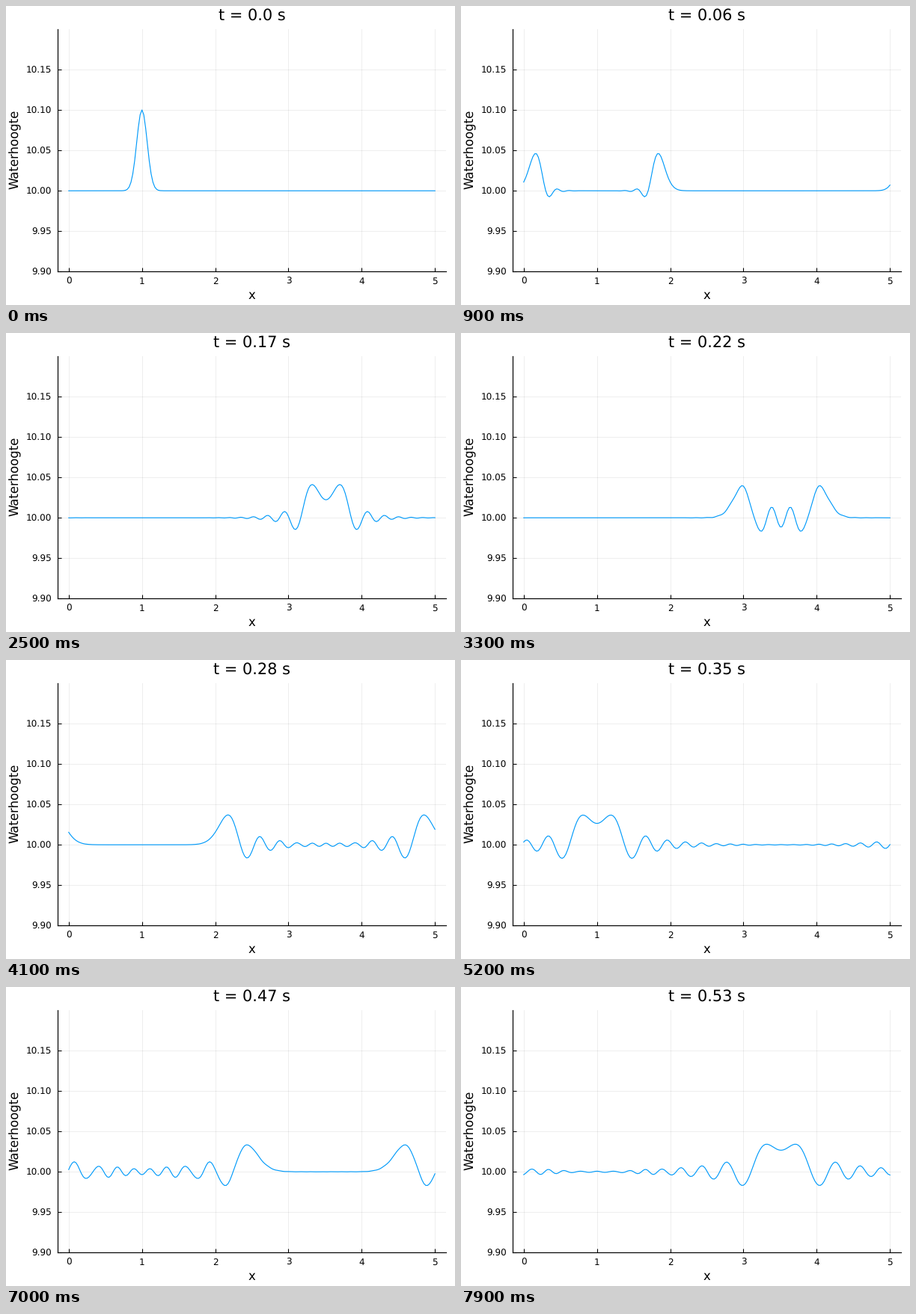
A matplotlib script for the animation above (8 s loop, 600x400 px).

```python
import numpy as np
import matplotlib.pyplot as plt
from matplotlib.animation import FuncAnimation

W, H, DPI = 600, 400, 100
FRAMES, INTERVAL = 80, 100
BLUE = "#009AFA"


def pt(px):
    """Pixels to points."""
    return px * 72 / DPI


plt.rcParams["font.family"] = "DejaVu Sans"
plt.rcParams["text.hinting"] = "none"

# Shallow-water flow on a periodic grid: water height h and discharge q
N, LENGTH, G, DT = 201, 5.0, 9.81, 0.0005
x = np.linspace(0, LENGTH, N)
dx = x[1] - x[0]

# The solver's step size drifts a little, so time is piecewise linear
STEPS = [0, 18, 33, 41, 52, 70, 79]
TIMES = [0, 0.1244, 0.2221, 0.2803, 0.3505, 0.4680, 0.5301]


def slope(f):
    return (np.roll(f, -1) - np.roll(f, 1)) / (2 * dx)


def rate(s):
    h, q = s
    return -np.array([slope(q), slope(q * q / h + G * h * h)])


def advance(s, dt):
    """One Runge-Kutta step."""
    a = rate(s)
    b = rate(s + dt / 2 * a)
    c = rate(s + dt / 2 * b)
    d = rate(s + dt * c)
    return s + dt / 6 * (a + 2 * b + 2 * c + d)


def simulate(times):
    state = np.array([10 + 0.1 * np.exp(-100 * (x - 1) ** 2), np.zeros(N)])
    heights = [state[0]]
    for span in np.diff(times):
        n = int(np.ceil(span / DT))
        for _ in range(n):
            state = advance(state, span / n)
        heights.append(state[0])
    return heights


times = np.interp(np.arange(FRAMES), STEPS, TIMES)
heights = simulate(times)

fig = plt.figure(figsize=(W / DPI, H / DPI), dpi=DPI, facecolor="white")
left, right, top, bottom = 69.1, 587.9, 30.8, 355.4
ax = fig.add_axes([left / W, 1 - bottom / H,
                   (right - left) / W, (bottom - top) / H])
ax.set_xlim(-0.15, 5.15)
ax.set_ylim(9.9, 10.2)
ax.set_xticks(range(6))
ax.set_yticks(np.arange(9.9, 10.16, 0.05))
ax.xaxis.set_major_formatter("{x:.0f}")
ax.yaxis.set_major_formatter("{x:.2f}")
ax.set_axisbelow(True)
ax.grid(color="black", alpha=0.065, lw=pt(1))
ax.tick_params(direction="in", length=pt(5.2), width=pt(1.1),
               labelsize=pt(12))
ax.tick_params(axis="x", pad=pt(7))
ax.tick_params(axis="y", pad=pt(7.8))
ax.spines[["top", "right"]].set_visible(False)
ax.spines[["left", "bottom"]].set_linewidth(pt(1.2))


def label(px, py, text, size, **kw):
    return fig.text(px / W, 1 - py / H, text, fontsize=pt(size),
                    ha="center", va="baseline", **kw)


mid = (left + right) / 2
title = label(mid, 18.4, "", 20.9)
label(mid, 391.5, "x", 16.5)
label(17, (top + bottom) / 2 - 0.8, "Waterhoogte", 16.5,
      rotation=90, rotation_mode="anchor")

curve, = ax.plot(x, heights[0], color=BLUE, lw=pt(1.15))


def draw(i):
    curve.set_ydata(heights[i])
    title.set_text(f"t = {round(float(times[i]), 2)} s")
    return curve, title


anim = FuncAnimation(fig, draw, frames=FRAMES, interval=INTERVAL,
                     repeat=True, repeat_delay=0, blit=False)
plt.show()
```
